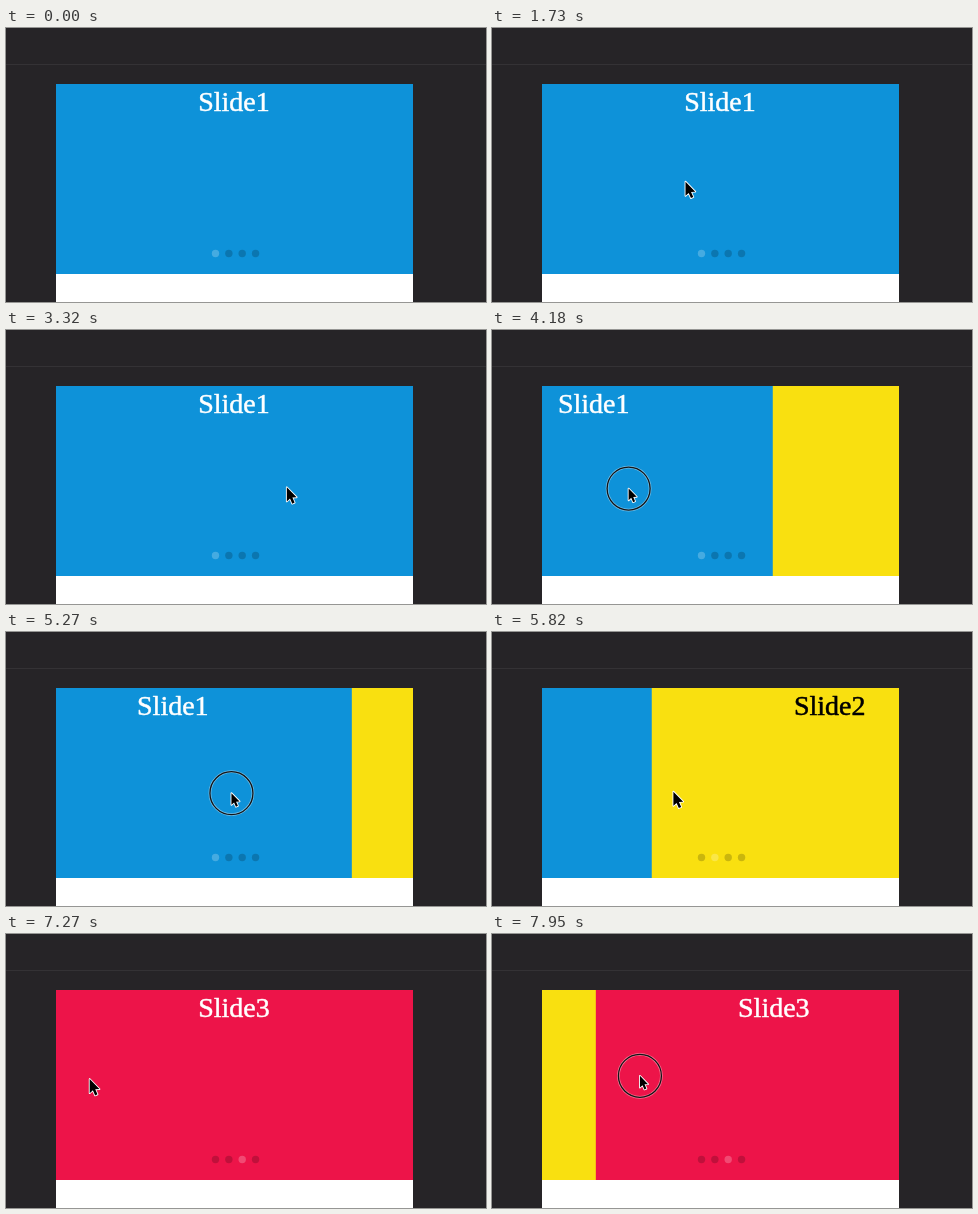
These frames come from a looping animation (480x274 px, 8000 ms). An HTML page with a canvas:

```html
<!DOCTYPE html>
<html lang="en">
<head>
<meta charset="utf-8">
<title>Swipe slider</title>
<style>
  html, body { margin: 0; width: 100%; height: 100%; overflow: hidden; background: #262427; }
  canvas { display: block; width: 100vw; height: 100vh; }
</style>
</head>
<body>
<canvas id="stage" width="480" height="274"></canvas>
<script>
const ctx = document.getElementById('stage').getContext('2d');
const LOOP = 8000;
const LAG = 70;    // the track follows the hand a little late
const SNAP = 350;  // settling time after a release
const BOX = { x: 50, y: 56, w: 357, h: 190 };

const SLIDES = [
  { label: 'Slide1', fill: '#0e92d9', ink: '#fff' },
  { label: 'Slide2', fill: '#f9e010', ink: '#000' },
  { label: 'Slide3', fill: '#ed1449', ink: '#fff' }
];

// Turning points of the hand; it eases from each one to the next.
const STOPS = [
  { t: 0, x: 262, y: 282 },
  { t: 750, x: 222, y: 188 },
  { t: 1730, x: 192.5, y: 152.5 },
  { t: 3300, x: 280, y: 156 },
  { t: 3410, x: 278, y: 157 },
  { t: 4552, x: 91, y: 157.5 },
  { t: 5340, x: 227, y: 160 },
  { t: 5650, x: 120, y: 159 },
  { t: 6160, x: 359, y: 157 },
  { t: 6790, x: 80, y: 151 },
  { t: 7400, x: 83, y: 143 },
  { t: 8200, x: 165, y: 140 }
];

// Each finished drag moves on by one slide.
const DRAGS = [
  { down: 3410, up: 5650 },
  { down: 6160, up: 6790 },
  { down: 7400, up: 8200 }
];

const mix = (a, b, u) => a + (b - a) * u;
const ease = u => (1 - Math.cos(Math.PI * Math.min(1, u))) / 2;

function handAt(t) {
  const i = STOPS.findIndex(s => s.t > t);
  const a = STOPS[i - 1], b = STOPS[i];
  const u = ease((t - a.t) / (b.t - a.t));
  return { x: mix(a.x, b.x, u), y: mix(a.y, b.y, u) };
}

function trackAt(t) {
  let base = 0, offset = 0;
  for (const { down, up } of DRAGS) {
    if (t < down) break;
    const late = Math.max(down, Math.min(t, up) - LAG);
    const pulled = base + handAt(late).x - handAt(down).x;
    if (t < up) return pulled;
    base -= BOX.w;
    offset = mix(pulled, base, ease((t - up) / SNAP));
  }
  return offset;
}

function circle(x, y, r) {
  ctx.beginPath();
  ctx.arc(x, y, r, 0, Math.PI * 2);
}

function outline(color, width) {
  ctx.strokeStyle = color;
  ctx.lineWidth = width;
  ctx.stroke();
}

function drawSlides(offset) {
  ctx.save();
  ctx.beginPath();
  ctx.rect(BOX.x, BOX.y, BOX.w, BOX.h);
  ctx.clip();
  ctx.font = '28px "Liberation Serif", "Times New Roman", serif';
  ctx.textAlign = 'center';
  ctx.lineWidth = 0.5;
  SLIDES.forEach((s, i) => {
    const x = BOX.x + i * BOX.w + offset;
    ctx.fillStyle = s.fill;
    ctx.fillRect(x, BOX.y, BOX.w + 1, BOX.h);
    ctx.fillStyle = ctx.strokeStyle = s.ink;
    ctx.fillText(s.label, x + 178, 83);
    ctx.strokeText(s.label, x + 178, 83);
  });
  ctx.restore();
}

function drawDots(active) {
  for (let i = 0; i < 4; i++) {
    ctx.fillStyle = i === active ? 'rgba(255,255,255,.23)' : 'rgba(0,0,0,.19)';
    circle(209.5 + i * 13.35, 225.5, 3.7);
    ctx.fill();
  }
}

function drawRing(x, y) {
  circle(x, y, 21.5);
  outline('rgba(255,255,255,.4)', 2.8);
  outline('#131316', 1.3);
}

function drawPointer(x, y, size) {
  const shape = [[0, 0], [0, 15], [3.4, 11.9], [5.8, 17.4], [8.3, 16.3], [5.9, 10.9], [10.4, 10.6]];
  ctx.beginPath();
  shape.forEach(([px, py]) => ctx.lineTo(x + px * size, y + py * size));
  ctx.closePath();
  ctx.lineJoin = 'round';
  outline('#fff', 1.8);
  ctx.fillStyle = '#000';
  ctx.fill();
}

function draw(t) {
  ctx.fillStyle = '#262427';
  ctx.fillRect(0, 0, 480, 274);
  ctx.fillStyle = '#343235';
  ctx.fillRect(0, 36, 480, 1);
  ctx.fillStyle = '#fff';
  ctx.fillRect(BOX.x, BOX.y + BOX.h, BOX.w, 40);

  drawSlides(trackAt(t));
  drawDots(DRAGS.filter(d => t >= d.up).length);

  const hand = handAt(t);
  const x = hand.x + 1, y = hand.y + 1.2;
  const pressed = DRAGS.some(d => t >= d.down && t < d.up);
  if (pressed) drawRing(x, y);
  drawPointer(x, y, pressed ? 0.78 : 0.94);
}

const start = performance.now();
function tick() {
  draw((performance.now() - start) % LOOP);
  requestAnimationFrame(tick);
}
tick();
</script>
</body>
</html>
```
